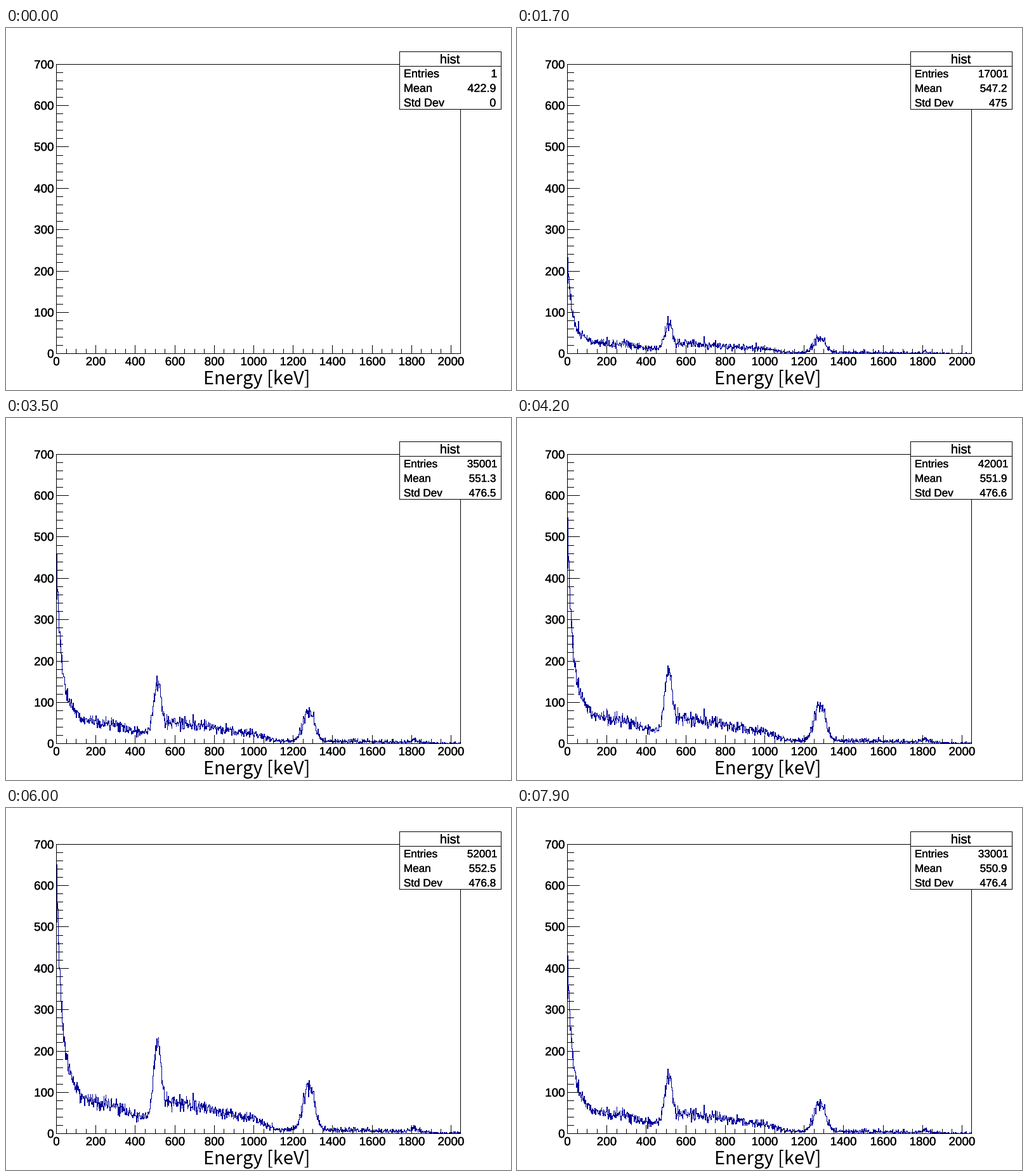
These frames come from a looping animation (796 px wide and 572 px high, 8 s). A matplotlib script:

```python
import matplotlib.pyplot as plt
import numpy as np
from matplotlib.animation import FuncAnimation
from matplotlib.patches import Rectangle
from matplotlib.patheffects import withStroke

plt.rcParams["path.simplify"] = False

W, H = 796, 572
LEFT, RIGHT = 0.1 * W, 0.9 * W
TOP, BOTTOM = 0.1 * H, 0.9 * H
E_MAX, C_MAX, BINS = 2048, 700, 1024
TURN, FRAMES = 56, 80  # the run plays forward until TURN, then backward

fig = plt.figure(figsize=(W / 72, H / 72), dpi=72, facecolor="white")
ax = fig.add_axes([0, 0, 1, 1])
ax.set_xlim(0, W)
ax.set_ylim(H, 0)
ax.axis("off")


def px(energy):
    return np.floor(LEFT + energy * (RIGHT - LEFT) / E_MAX) + 0.5


def py(count):
    return np.floor(BOTTOM - count * (BOTTOM - TOP) / C_MAX) + 0.5


def line(xs, ys, color="black", z=3, join="miter"):
    return ax.plot(xs, ys, color=color, lw=1, antialiased=False, snap=False,
                   solid_capstyle="projecting", solid_joinstyle=join,
                   zorder=z)[0]


def box(x0, y0, x1, y1, z):
    line([x0, x1, x1, x0, x0], [y0, y0, y1, y1, y0], z=z)


def label(x, y, s, size, ha="left"):
    return ax.text(x, y, s, fontsize=size, ha=ha, va="baseline", zorder=6,
                   family="Liberation Sans",
                   path_effects=[withStroke(linewidth=0.3, foreground="black")])


def edge(e, center, width):
    """Smooth step from 1 down to 0."""
    return 1 / (1 + np.exp((e - center) / width))


def peak(e, height, center, sigma):
    return height * np.exp(-0.5 * ((e - center) / sigma) ** 2)


def spectrum(e):
    """Expected counts per bin after 50000 events."""
    noise = 330 * np.exp(-e / 5) + 375 * np.exp(-e / 29) + 97 * np.exp(-e / 80)
    low = 28 * (1 + edge(e, 350, 20))
    high = (68 - 0.1 * (e - 560)) * edge(e, 1070, 20)
    split = edge(e, 525, 12)
    tail = 1.5 + 8 * edge(e, 1700, 100) + peak(e, 8, 1810, 35)
    lines = peak(e, 166, 511, 18) + peak(e, 105, 1280, 28)
    threshold = 1 - np.exp(-e / 1.1)
    return threshold * (noise + low * split + high * (1 - split) + tail + lines)


# Events arrive in random order, one equal batch per frame.
rng = np.random.default_rng(5)
energy = (np.arange(BINS) + 0.5) * E_MAX / BINS
final = rng.poisson(spectrum(energy) * TURN / 50)
events = rng.permutation(np.repeat(np.arange(BINS), final))
batches = [np.bincount(b, minlength=BINS)
           for b in np.array_split(events, TURN)]
totals = np.vstack([np.zeros(BINS), np.cumsum(batches, axis=0)])

edges = px(np.arange(BINS + 1) * E_MAX / BINS)
hist = line(np.repeat(edges, 2)[1:-1], np.full(2 * BINS, py(0)),
            "#000099", 2, "round")

# Frame and axes
x0, x1, y0, y1 = px(0), px(E_MAX), py(0), py(C_MAX)
box(x0, y0, x1, y1, 3)
for v in range(0, C_MAX + 1, 20):
    major = v % 100 == 0
    line([x0, x0 + (19 if major else 10)], [py(v)] * 2)
    if major:
        label(75.6, py(v) + 6.5, str(v), 18.8, "right")
for v in range(0, E_MAX, 50):
    major = v % 200 == 0
    line([px(v)] * 2, [y0, y0 - (13 if major else 7)])
    if major:
        label(px(v), 533, str(v), 18.8, "center")
ax.text(395.2, 563, "Energy [keV]", fontsize=29, ha="center",
        va="baseline", family="Noto Sans CJK JP")

# Statistics box
ax.add_patch(Rectangle((620.5, 37.5), 160, 91, facecolor="white",
                       edgecolor="none", zorder=4))
box(620.5, 37.5, 780.5, 128.5, 5)
line([620.5, 780.5], [60.5, 60.5], z=5)
label(699.6, 56, "hist", 20.2, "center")
rows = [(label(626.9, 78 + 23 * i, s, 18), label(x, 78 + 23 * i, "", 18, "right"))
        for i, (s, x) in enumerate((("Entries", 774.3), ("Mean", 772.4),
                                    ("Std Dev", 772.4)))]


def moments(k):
    if k == 0:
        return 422.9, 0
    keys = (9, 26, 35, 50)
    return (np.interp(k, keys, (545, 549.7, 551.3, 552.5)),
            np.interp(k, keys, (474.1, 476, 476.5, 476.8)))


def update(i):
    k = min(i, 2 * TURN - i)
    hist.set_ydata(np.repeat(py(np.minimum(totals[k], C_MAX)), 2))
    mean, dev = moments(k)
    texts = (f"{1000 * k + 1}", f"{mean:.4g}", f"{dev:.4g}")
    for (name, value), s in zip(rows, texts):
        value.set_text(s)
        for t in (name, value):
            t.set_fontsize(17.1 if k else 18)
    return [hist]


anim = FuncAnimation(fig, update, frames=FRAMES, interval=100,
                     repeat=True, repeat_delay=0, blit=False)
plt.show()
```
